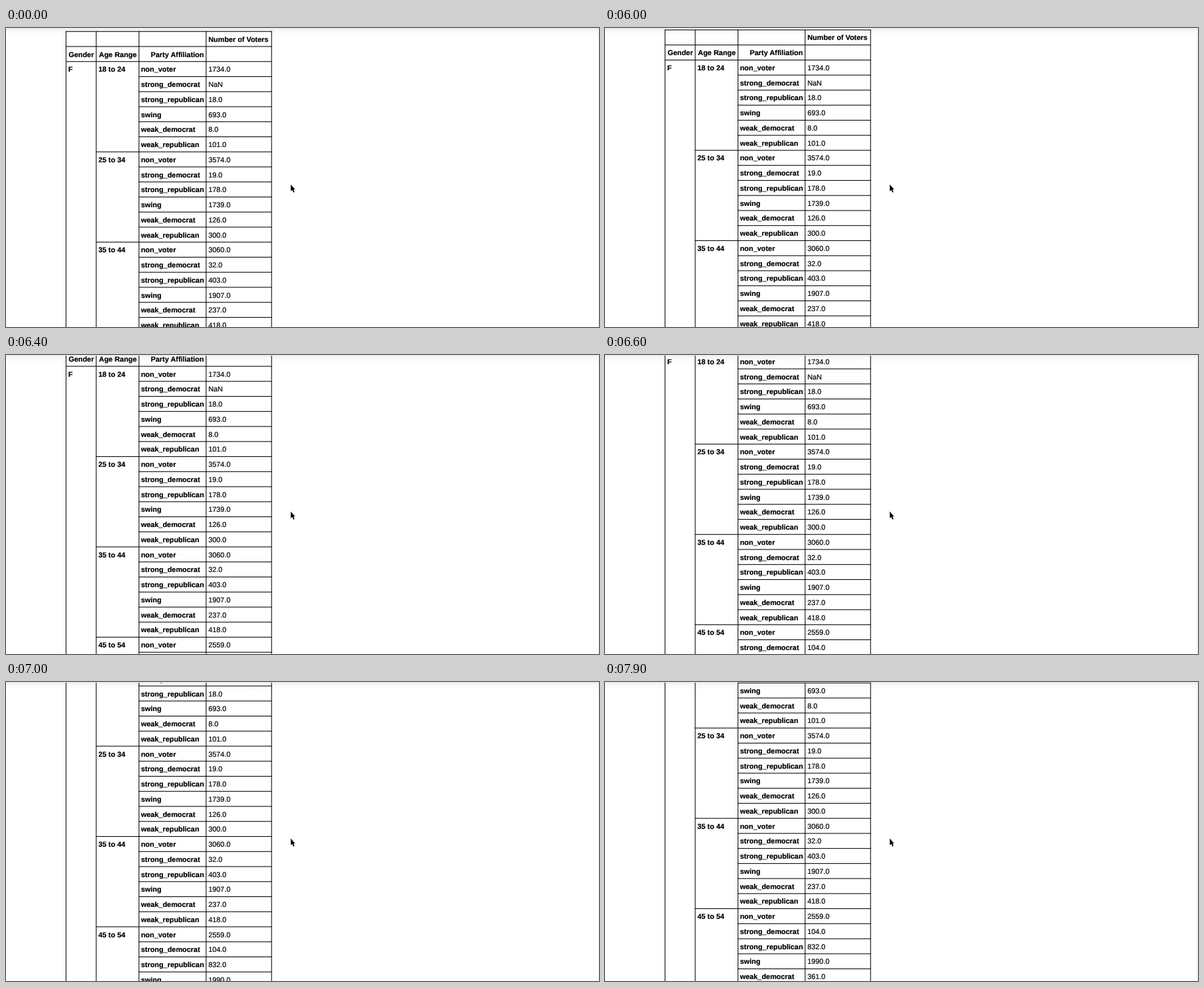
Write an HTML page that moves like this. It is 895 px wide and 452 px high and loops after 8 s.

```html
<!DOCTYPE html>
<html lang="en">
<head>
<meta charset="utf-8">
<title>Voter table</title>
<style>
  html, body { margin: 0; width: 100%; height: 100%; overflow: hidden; background: #fff; }
  svg { display: block; width: 895px; height: 452px; }
  text {
    font: 10.92px "Liberation Sans", Arial, sans-serif;
    text-rendering: geometricPrecision;
    stroke: #000; stroke-width: .2px;
  }
  .bold { font-weight: bold; }
  .end { text-anchor: end; }
</style>
</head>
<body>
<svg viewBox="0 0 895 452">
  <defs>
    <linearGradient id="shade" x1="0" y1="0" x2="0" y2="1">
      <stop offset="0" stop-color="#f0f0f0"/>
      <stop offset=".3" stop-color="#f8f8f8"/>
      <stop offset="1" stop-color="#fff"/>
    </linearGradient>
    <clipPath id="page"><rect y="1" width="895" height="451"/></clipPath>
    <path id="arrow" fill="#f00" d="M0 0L16-8H20L8-1.6H37V1.6H8L20 8H16Z"/>
  </defs>
  <rect width="895" height="452" fill="#fff"/>
  <rect y="1" width="895" height="11" fill="url(#shade)"/>
  <rect width="895" height="2" fill="#eee"/>
  <rect x="894" width="1" height="452" fill="#e6e6e6"/>
  <g clip-path="url(#page)">
    <g id="table">
      <g id="rules"></g>
      <g id="labels"></g>
    </g>
  </g>
  <path d="M429.8 236.6V246.7L432 244.8L433.7 248.8L435.4 248L433.8 244.2H436.4Z"
        stroke="#fff" stroke-width=".6" paint-order="stroke"/>
  <g id="arrows">
    <use href="#arrow" x="408" y="199"/>
    <use href="#arrow" x="408" y="245"/>
    <use href="#arrow" x="408" y="268"/>
  </g>
</svg>
<script>
const LOOP = 8000, STEP = 100;
const TOP = 4.7, PITCH = 22.75, BASELINE = 16.1, RULE = 1.05;
const COLUMNS = [90.1, 135.6, 200.2, 301.5, 400.3];
const PARTIES = ["non_voter", "strong_democrat", "strong_republican",
                 "swing", "weak_democrat", "weak_republican"];
const GROUPS = [
  ["18 to 24", [1734, NaN, 18, 693, 8, 101]],
  ["25 to 34", [3574, 19, 178, 1739, 126, 300]],
  ["35 to 44", [3060, 32, 403, 1907, 237, 418]],
  ["45 to 54", [2559, 104, 832, 1990, 361]]
];
// [time, scroll offset]
const SCROLL = [[5900, 0], [6000, 2.3], [6100, 7.5], [6200, 14.8], [6600, 52.5],
  [6800, 74], [6900, 83.5], [7000, 90.2], [7100, 92.5], [7400, 92.5],
  [7500, 95], [7600, 100], [7800, 113], [7900, 117.6]];

const $ = id => document.getElementById(id);

function add(parent, tag, attrs, content = "") {
  const node = document.createElementNS("http://www.w3.org/2000/svg", tag);
  for (const key in attrs) node.setAttribute(key, attrs[key]);
  node.textContent = content;
  return parent.appendChild(node);
}

const label = (text, x, row, style = "bold") =>
  add($("labels"), "text", { x, y: TOP + BASELINE + row * PITCH, class: style }, text);

const rule = (x, y, width, height) => add($("rules"), "rect", { x, y, width, height });

label("Number of Voters", 305.4, 0);
label("Gender", 132.7, 1, "bold end");
label("Age Range", 197.3, 1, "bold end");
label("Party Affiliation", 298.7, 1, "bold end");
label("F", 93.9, 2);

GROUPS.forEach(([range, counts], g) => {
  const first = 2 + g * PARTIES.length;
  label(range, 139.4, first);
  counts.forEach((count, i) => {
    label(PARTIES[i], 203.7, first + i);
    label(isNaN(count) ? "NaN" : count.toFixed(1), 305.4, first + i, "");
  });
});

COLUMNS.forEach(x => rule(x, TOP, RULE, 700));

for (let row = 0; row < 26; row++) {
  const startsGroup = (row - 2) % PARTIES.length === 0;
  const x = COLUMNS[row < 3 ? 0 : startsGroup ? 1 : 2];
  rule(x, TOP + row * PITCH, COLUMNS[4] + RULE - x, RULE);
}

function scrollAt(time) {
  const next = SCROLL.findIndex(([t]) => t >= time);
  if (next === 0) return 0;
  if (next < 0) return SCROLL[SCROLL.length - 1][1];
  const [t0, y0] = SCROLL[next - 1], [t1, y1] = SCROLL[next];
  return y0 + (y1 - y0) * (time - t0) / (t1 - t0);
}

function render(time) {
  const tick = Math.floor(time / STEP) * STEP;
  $("table").setAttribute("transform", `translate(0 ${-scrollAt(tick)})`);
  $("arrows").setAttribute("visibility", tick >= 1000 && tick < 6000 ? "visible" : "hidden");
}

const start = performance.now();
function frame() {
  render((performance.now() - start) % LOOP);
  requestAnimationFrame(frame);
}
frame();
</script>
</body>
</html>
```
